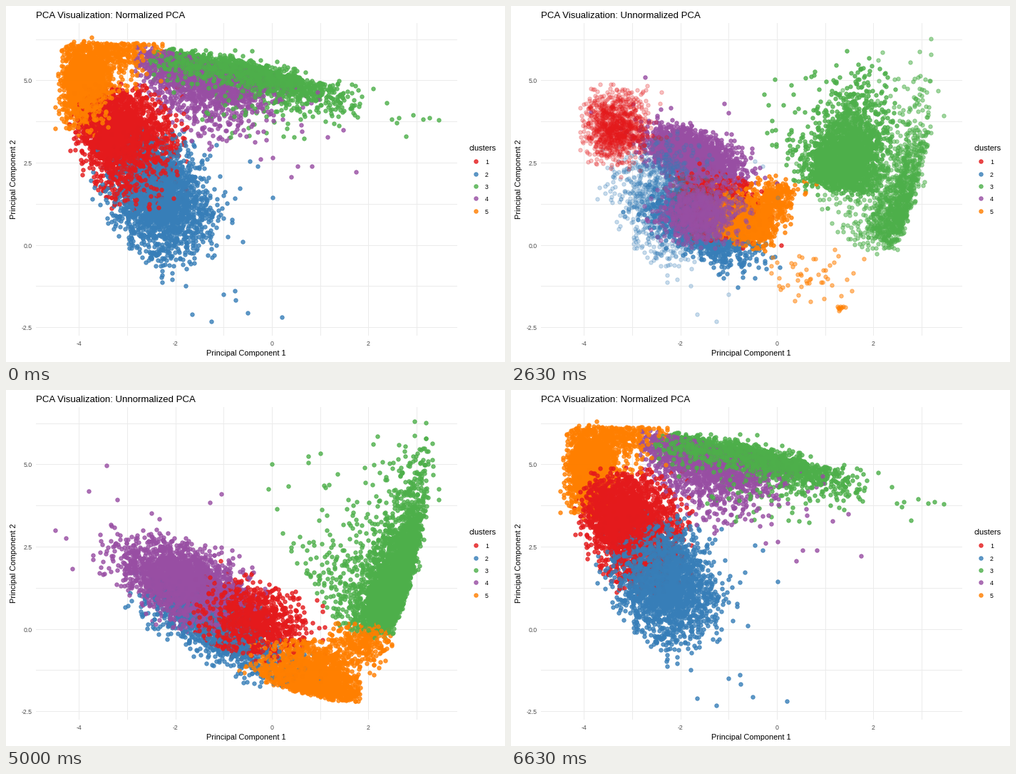
Animation, 700 px wide and 500 px high, one loop 6.67 s. Source, as a matplotlib script:

```python
import numpy as np
import matplotlib.pyplot as plt
from matplotlib.animation import FuncAnimation

W, H, DPI = 700, 500, 100
FRAMES, INTERVAL = 200, 33.35
STEPS = 50          # frames in one transition
LAYERS = 4          # interleaved drawing layers per cluster
ALPHA = 0.8
COLORS = {1: "#E41A1C", 2: "#377EB8", 3: "#4DAF4A", 4: "#984EA3", 5: "#FF7F00"}
STACK = [2, 4, 1, 3, 5]
PANEL = (42, 633, 24, 463)      # left, right, top, bottom in pixels
X0, XU = 373, 67.7              # pixel of x = 0, pixels per unit
Y0, YU = 335.5, 46.2

rng = np.random.default_rng(7)
plt.rcParams["font.family"] = "Liberation Sans"


def sample(n, gen, keep):
    """Draw n points from gen that satisfy keep."""
    x, y = gen(n * 6)
    ok = keep(x, y)
    return np.column_stack([x[ok], y[ok]])[:n]


def blob(n, cx, cy, sx, sy, keep, slope=0.0):
    def gen(k):
        x = rng.normal(cx, sx, k)
        return x, cy + slope * (x - cx) + rng.normal(0, sy, k)
    return sample(n, gen, keep)


def box(x1, x2, y1, y2):
    return lambda x, y: (x > x1) & (x < x2) & (y > y1) & (y < y2)


def mix(*parts):
    return rng.permutation(np.vstack(parts))


# --- normalized state -------------------------------------------------------
def red_norm():
    inside = lambda x, y: (box(-4.25, -1.75, 1.05, 4.9)(x, y)
                           & (y > 1.2 - 1.7 * (x + 3.4)))
    movers = blob(1500, -2.9, 3.0, 0.46, 0.8, inside)
    rest = blob(1050, -3.35, 3.6, 0.34, 0.52, box(-4.08, -2.1, 2.0, 4.9))
    return movers, rest


def blue_norm():
    inside = lambda x, y: (box(-3.9, -0.5, -1.25, 3.6)(x, y)
                           & (y > -1.1 - 1.75 * (x + 2.4)))
    movers = mix(blob(950, -2.3, 1.45, 0.5, 0.85, inside, -0.3),
                 [(0.21, -2.2), (-0.5, -2.07), (-0.77, -1.4), (-0.75, -1.67)])
    rest = mix(blob(1150, -2.35, 1.35, 0.48, 0.85, inside, -0.3),
               [(-1.26, -2.33), (-1.65, -2.11), (0.01, 1.44), (-0.3, 2.4),
                (-0.46, 2.55), (-1.0, -1.5), (-0.6, 0.1)])
    return movers, rest


def green_norm():
    def gen(k):
        x = rng.normal(-0.65, 0.95, k)
        y = (5.33 - 0.31 * (x + 0.6) - 0.03 * (x + 0.6) ** 2
             + rng.normal(0, 0.17, k) - rng.exponential(0.14, k))
        return x, y
    far = [(2.1, 4.75), (2.38, 4.32), (2.48, 3.83), (2.58, 3.72), (2.63, 3.86),
           (2.78, 3.3), (2.92, 3.94), (3.13, 3.83), (3.26, 3.87), (3.45, 3.8)]
    low = blob(130, 0.5, 4.3, 0.9, 0.4, box(-1.9, 2.0, 3.0, 5.0))
    return mix(sample(1950, gen, box(-2.55, 1.9, 3.1, 6.0)), low, far)


def purple_norm():
    def gen(k):
        x = rng.normal(-1.45, 0.72, k)
        return x, 5.95 - 0.32 * (x + 2.3) - rng.gamma(1.6, 0.45, k)
    inside = lambda x, y: (box(-2.85, 1.0, 2.9, 6.15)(x, y)
                           & (y > 4 - 1.3 * (x + 2.3)))
    far = [(0.4, 2.07), (0.53, 2.4), (0.82, 2.4), (1.75, 2.22), (0.02, 2.65),
           (-0.24, 2.6), (1.15, 3.28), (1.48, 3.5)]
    return mix(sample(1800, gen, inside), far)


def orange_norm():
    def arm(k):
        return (-3.7 + rng.gamma(1.8, 0.33, k), 6.15 - rng.gamma(1.4, 0.33, k))
    return mix(blob(1800, -3.87, 4.88, 0.23, 0.6, box(-4.45, -3.1, 3.3, 6.2)),
               sample(300, arm, box(-3.7, -2.25, 4.5, 6.2)),
               [(-3.73, 6.3), (-4.49, 4.18), (-4.49, 3.53)])


# --- unnormalized state -----------------------------------------------------
def red_raw():
    inside = lambda x, y: (box(-1.75, 1.15, -1.05, 2.1)(x, y)
                           & (y > -0.3 - 0.8 * (x + 1.5)))
    return blob(1500, -0.5, 0.25, 0.52, 0.55, inside, -0.2)


def blue_raw():
    inside = lambda x, y: (box(-3.2, 1.2, -1.75, 2.2)(x, y)
                           & (y > -0.4 - 0.8 * (x + 2.2)))
    return blob(954, -1.15, -0.15, 0.72, 0.45, inside, -0.7)


def green_raw(n):
    def gen(k):
        y = -0.33 + rng.gamma(2.9, 0.68, k)
        gap = np.where(rng.random(k) < 0.72, np.abs(rng.normal(0, 0.36, k)),
                       rng.exponential(0.85, k))
        ridge = 2.45 + 0.27 * y - 0.022 * y ** 2
        return ridge - gap + rng.normal(0, 0.06, k), y
    inside = lambda x, y: (box(0.1, 3.4, -0.35, 5.9)(x, y)
                           & (y > 0.9 * (1.5 - x)) & (x + 0.45 * y > 1.4))
    return sample(n, gen, inside)


def purple_raw():
    inside = lambda x, y: (box(-3.75, 0.0, -0.1, 3.9)(x, y)
                           & (y > 0.75 - 0.75 * (x + 2.6)))
    far = [(-4.49, 3.0), (-4.27, 2.75), (-4.13, 1.82), (-3.79, 4.18),
           (-3.43, 4.97), (-3.2, 3.92), (-1.05, 4.1), (-1.28, 3.85)]
    movers = mix(blob(1800, -1.95, 1.55, 0.62, 0.52, inside, -0.4), far)
    rest = blob(900, -1.6, 0.95, 0.38, 0.42, box(-2.8, -0.1, -0.1, 2.8))
    return movers, rest


def orange_raw():
    def gen(k):
        x = rng.normal(0.85, 0.52, k)
        return x, -1.72 - 0.45 * x + 0.07 * x ** 2 + rng.gamma(2, 0.33, k)
    movers = mix(sample(1853, gen, box(-0.75, 1.83, -2.35, -0.3)),
                 blob(250, 1.9, -0.4, 0.32, 0.38, box(1.2, 2.5, -1.4, 0.18)))
    rest = mix(blob(48, 0.75, -1.0, 0.65, 0.45, box(-0.3, 2.4, -1.75, 0.15)),
               blob(10, 1.3, -1.95, 0.07, 0.08, box(1.1, 1.5, -2.1, -1.75)))
    return movers, rest


# --- figure -----------------------------------------------------------------
fig = plt.figure(figsize=(W / DPI, H / DPI), dpi=DPI, facecolor="white")
left, right, top, bottom = PANEL
ax = fig.add_axes([left / W, 1 - bottom / H, (right - left) / W, (bottom - top) / H])
ax.set_xlim((left - X0) / XU, (right - X0) / XU)
ax.set_ylim((Y0 - bottom) / YU, (Y0 - top) / YU)
ax.axis("off")


def px(size):
    return size * 72 / DPI


def label(x, y, text, size, color="black", **kw):
    return fig.text(x / W, 1 - y / H, text, fontsize=px(size), color=color, **kw)


GRID = "#EBEBEB"
for x in range(-4, 4):
    ax.axvline(x, color=GRID, lw=px(1.0), zorder=0)
for i in range(-2, 6):
    ax.axhline(1.25 * i, color=GRID, lw=px(1.0), zorder=0)

for x in (-4, -2, 0, 2):
    label(X0 + x * XU, 477, str(x), 8.8, "#4D4D4D", ha="center")
for y in (-2.5, 0, 2.5, 5):
    label(37, Y0 - y * YU + 4, f"{y:.1f}", 8.8, "#4D4D4D", ha="right")
label(337, 491, "Principal Component 1", 11, ha="center")
label(11.5, 243.5, "Principal Component 2", 11, rotation=90,
      ha="center", va="center")
title = label(42, 17, "", 13.2)

DOT = dict(ls="none", marker="o", ms=px(5.4), mew=px(1.0))
label(650, 203, "clusters", 11)
legend_ax = fig.add_axes([0, 0, 1, 1])
legend_ax.set(xlim=(0, W), ylim=(H, 0))
legend_ax.axis("off")
for k, color in COLORS.items():
    y = 201 + 17.3 * k
    legend_ax.plot([658.5], [y], color=color, alpha=ALPHA, **DOT)
    label(672, y + 4, str(k), 8.8)


# --- clusters ---------------------------------------------------------------
class Part:
    """One drawing layer of a cluster; a missing end means it fades."""

    def __init__(self, k, layer, norm, raw):
        self.norm, self.raw = norm, raw
        rank = STACK.index(k)
        self.rest_z = 1 + layer * 10 + rank
        self.rank = rank
        self.fades = norm is None or raw is None
        self.line, = ax.plot([], [], color=COLORS[k], clip_on=False, **DOT)

    def update(self, share, forward, moving):
        """share is the progress from normalized (0) to unnormalized (1)."""
        z, alpha = self.rest_z, ALPHA
        if self.fades:
            pts = self.raw if self.norm is None else self.norm
            alpha *= share if self.norm is None else 1 - share
            if moving:
                entering = (self.norm is None) == forward
                z = (200 if entering else 100) + self.rank
        else:
            pts = self.norm + share * (self.raw - self.norm)
        self.line.set_data(pts[:, 0], pts[:, 1])
        self.line.set_alpha(alpha)
        self.line.set_visible(alpha > 0.002)
        self.line.set_zorder(z)


parts = []


def add_cluster(k, norm, raw, norm_rest=None, raw_rest=None):
    n = min(len(norm), len(raw))
    for i in range(LAYERS):
        parts.append(Part(k, i, norm[:n][i::LAYERS], raw[:n][i::LAYERS]))
        if norm_rest is not None:
            parts.append(Part(k, i, norm_rest[i::LAYERS], None))
        if raw_rest is not None:
            parts.append(Part(k, i, None, raw_rest[i::LAYERS]))


norm, rest = red_norm()
add_cluster(1, norm, red_raw(), norm_rest=rest)
norm, rest = blue_norm()
add_cluster(2, norm, blue_raw(), norm_rest=rest)
norm = green_norm()
green_far = [(0, 5.0), (0.75, 5.06), (0.34, 4.35), (-0.08, 4.25), (0.1, 3.65),
             (2.95, 6.3), (3.45, 4.25), (3.33, 5.63)]
raw = mix(green_raw(len(norm) - len(green_far)), green_far)
rest = mix(green_raw(1150), [(2.19, 5.86), (3.19, 6.27), (3.45, 3.93)])
add_cluster(3, norm, raw, raw_rest=rest)
raw, rest = purple_raw()
add_cluster(4, purple_norm(), raw, raw_rest=rest)
raw, rest = orange_raw()
add_cluster(5, orange_norm(), raw, raw_rest=rest)


def ease(p):
    p = min(max(p, 0), 1)
    return 4 * p ** 3 if p < 0.5 else 1 - 4 * (1 - p) ** 3


def update(n):
    forward = n < 125
    if forward:
        share = ease((n - 50) / STEPS)
    else:
        share = 1 - ease((n - 149) / STEPS)
    moving = 51 < n < 102 or 150 < n < 199
    for part in parts:
        part.update(share, forward, moving)
    name = "Unnormalized" if share > 0.5 else "Normalized"
    title.set_text(f"PCA Visualization: {name} PCA")
    return [part.line for part in parts] + [title]


anim = FuncAnimation(fig, update, frames=FRAMES, interval=INTERVAL,
                     repeat=True, repeat_delay=0, blit=False)
plt.show()
```
